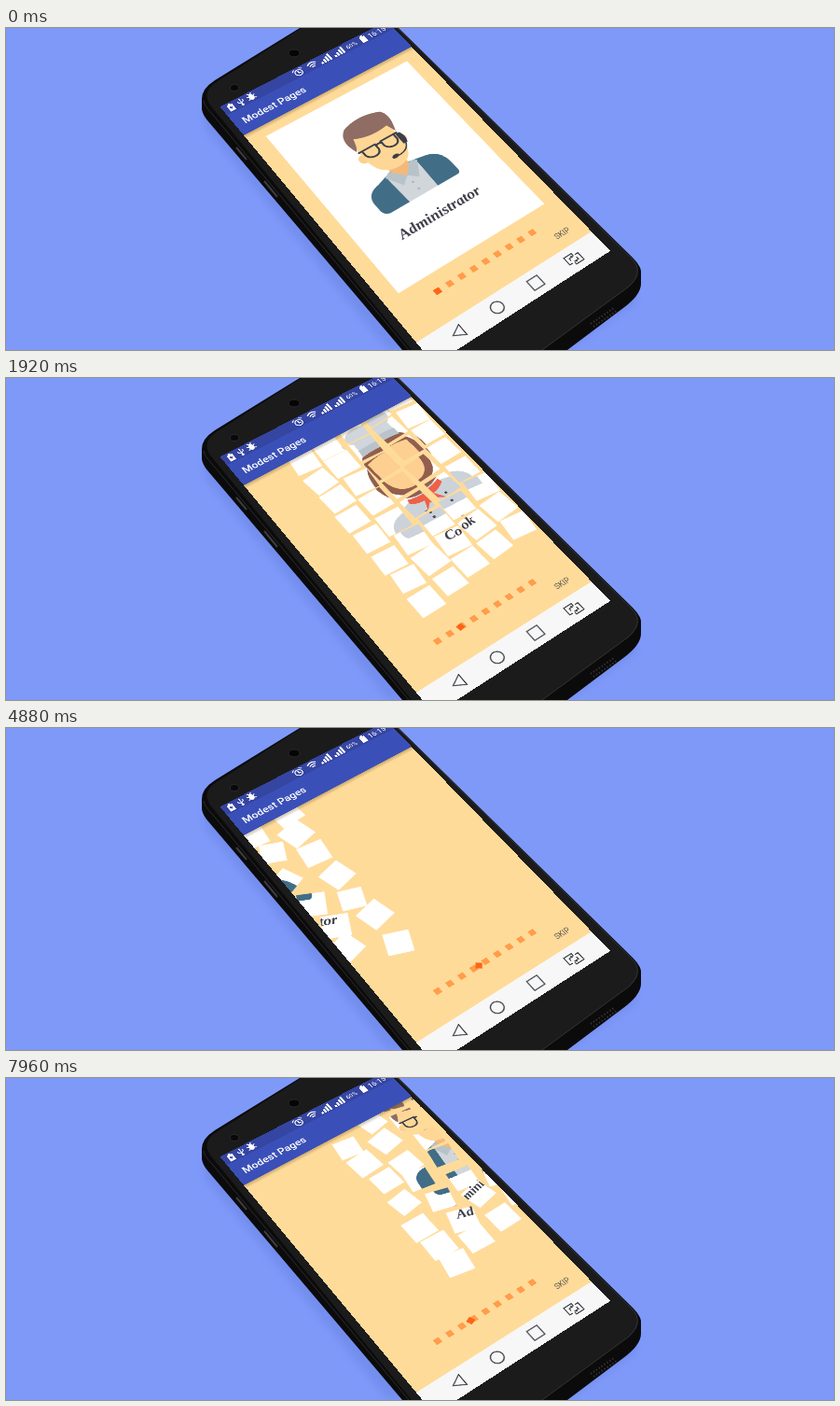
Recreate the animation shown at these times as an HTML page with a canvas. Size 888 px wide and 345 px high, loop 8 s.

```html
<!DOCTYPE html>
<html lang="en">
<head>
<meta charset="utf-8">
<title>Shattering pager</title>
<style>
html, body { margin: 0; width: 100%; height: 100%; overflow: hidden; background: #7f99f9; }
body { position: relative; }
body > svg { position: absolute; left: 0; top: 0; }
/* a flat 360 x 640 dp screen, laid onto the tilted phone */
#screen {
  position: absolute; left: 0; top: 0; width: 360px; height: 640px; overflow: hidden;
  background: #ffdb9a; transform-origin: 0 0;
  transform: matrix3d(.5714, -.2606, 0, .0001642, .27246, .36563, 0, -.0002018, 0, 0, 1, 0, 233.2, 85.75, 0, 1.01614);
}
#screen > * { position: absolute; left: 0; top: 0; }
text { font-family: Roboto, Arial, sans-serif; }
</style>
</head>
<body>
<svg width="888" height="345" viewBox="0 0 888 345">
  <defs><filter id="soft" x="-20%" y="-20%" width="140%" height="140%"><feGaussianBlur stdDeviation="4"/></filter></defs>
  <path d="M212 88L214 108L410 345H602L676 294L670 250Z" fill="#6c86e6" opacity=".6" filter="url(#soft)"/>
  <path d="M315 0L224 56Q210 65 210 76V87Q211 93 216 99L425 345H602L662 300Q681 286 681 274V260Q680 254 672 246L421 0Z" fill="#0b0b0c"/>
  <path d="M317 0L227 57Q208 68 220 84L435 345H575L668 277Q686 263 671 247L420 0Z" fill="#1b1b1c"/>
  <path d="M212 78Q213 84 221 92L432 345" fill="none" stroke="#2c2c2e"/>
  <path d="M420 0L671 247Q685 261 668 277L575 345" fill="none" stroke="#343436"/>
  <path d="M247 128L258 141M277 164L291 181" stroke="#3c3c3e" stroke-width="2"/>
  <path d="M627 317L652 300M630 320L655 303" stroke="#333" stroke-width="2" stroke-dasharray="1.5 2"/>
  <ellipse cx="309" cy="27" rx="6" ry="4" fill="#050506" stroke="#29292c"/>
  <ellipse cx="245" cy="64" rx="4.5" ry="3.5" fill="#08080a" stroke="#29292c"/>
</svg>
<div id="screen">
  <canvas id="pager" width="360" height="640"></canvas>
  <svg width="360" height="640" viewBox="0 0 360 640">
    <defs><linearGradient id="drop" x2="0" y2="1"><stop stop-color="#604000" stop-opacity=".32"/><stop offset="1" stop-color="#604000" stop-opacity="0"/></linearGradient></defs>
    <rect y="80" width="360" height="9" fill="url(#drop)"/>
    <rect width="360" height="80" fill="#3a50b8"/>
    <rect width="360" height="24" fill="#3545a2"/>
    <text x="16" y="59" font-size="20" font-weight="500" fill="#fff">Modest Pages</text>
    <g fill="#fff">
      <path d="M10 6H13V3H18V6H21V21H10Z"/>
      <path d="M15 9L12 14H15L14 18L19 12H16Z" fill="#3545a2"/>
      <path d="M36 3V19M31 8V12L36 15M41 7V11L36 14" stroke="#fff" stroke-width="1.8" fill="none"/>
      <circle cx="36" cy="19" r="2.5"/>
      <ellipse cx="57" cy="13" rx="5" ry="7"/>
      <path d="M49 9L65 18M49 18L65 9M53 3L57 7L61 3" stroke="#fff" stroke-width="2" fill="none"/>
      <path d="M178 9Q187 1 196 9M181 13Q187 8 193 13M184 17Q187 14 190 17" stroke="#fff" stroke-width="2.4" fill="none"/>
      <g id="bars"><path d="M203 21V16H207V21ZM209 21V12H213V21ZM215 21V8H219V21ZM221 21V4H225V21Z"/></g>
      <use href="#bars" x="29"/>
      <path d="M293 6H296V3H301V6H304V21H293Z"/>
      <text x="261" y="17" font-size="12">60%</text>
      <text x="310" y="18" font-size="15">16:15</text>
    </g>
    <g fill="none" stroke="#fff" stroke-width="2"><circle cx="157" cy="13" r="7"/><path d="M157 8V14H161M147 7L152 3M162 3L167 7"/></g>
    <text x="318" y="571" font-size="14" text-anchor="middle" fill="#5d564b">SKIP</text>
    <rect y="592" width="360" height="48" fill="#f7f7f7"/>
    <g fill="none" stroke="#42464c" stroke-width="2">
      <path d="M54 616L73 605V627Z"/>
      <circle cx="142" cy="616" r="11"/>
      <rect x="210.5" y="605.5" width="21" height="21"/>
      <path d="M294 622H288V606H304V611M308 611H314V627H298V622M295 617V612H302L299 609M307 616V621H300L303 624"/>
    </g>
  </svg>
</div>
<script>
const LOOP = 8000, STEP = 40;
const CARD = { x: 29.5, y: 103.5, w: 302, h: 398, cols: 6, rows: 8 };
const ctx = document.getElementById('pager').getContext('2d');
const clamp = v => Math.max(0, Math.min(1, v));
const rnd = n => { const v = Math.sin(n * 12.9898 + 4.1) * 43758.5453; return v - Math.floor(v); };

// each part: [fill, path, stroke colour, stroke width]
const admin = [
  ['#416d87', 'M82 262Q70 260 70 246V230Q72 207 98 202L130 191H170L202 197Q229 204 229 236V252Q229 262 222 262Z'],
  ['#d0d6da', 'M118 196L150 212L182 194L180 262H121Z'],
  ['#f3b97b', 'M131 176H169V196L150 215L131 196Z'],
  ['#b7c3c9', 'M128 190L150 214L134 228L116 197ZM172 190L150 214L166 228L184 196Z'],
  ['#aab4ba', 'M148 229h4v4h-4zM148 246h4v4h-4z'],
  ['#fdd08e', 'M101 142a9 10 0 0 1 18 0a9 10 0 0 1-18 0M181 142a9 10 0 0 1 18 0a9 10 0 0 1-18 0'],
  ['#fed796', 'M111 88H189V145Q186 190 150 190Q114 190 111 145Z'],
  ['#8f6d64', 'M109 122Q96 86 119 68Q156 53 193 70Q206 84 191 122L185 103Q148 110 120 95Q116 112 109 122Z'],
  [, 'M117 126H144V138Q142 148 131 148Q119 147 117 137ZM156 126H183V138Q181 148 170 148Q158 147 156 137ZM144 130Q150 126 156 130M109 126H117M183 126H191', '#3d3e49', 3.6],
  ['#3d3e49', 'M186 128h8q6 12 0 26h-8zM152 167q8-6 14 0q-4 8-14 4z'],
  [, 'M191 152Q186 170 163 170', '#3d3e49', 2.5]
];
const cashier = [
  ['#4b4651', 'M99 148Q94 60 124 32Q155 12 186 32Q216 62 211 148Q205 180 177 180H132Q104 178 99 148Z'],
  ['#ee6248', 'M80 248Q68 240 70 224Q74 203 100 197L132 186H178L208 195Q238 202 238 234Q238 250 224 250Z'],
  ['#d5503a', 'M100 224L106 250H98ZM207 224L202 250H210Z'],
  ['#f3b97b', 'M136 168H174V190L155 208L136 190Z'],
  ['#d3dae2', 'M134 184L155 206L139 217L125 191ZM176 184L155 206L171 217L185 191Z'],
  ['#fdcf90', 'M114 76H196V132Q192 184 155 184Q118 184 114 132Z'],
  ['#ef6046', 'M112 48Q155 28 198 48L200 72Q155 58 110 72Z'],
  ['#cf4836', 'M110 72Q155 54 200 72V84Q155 68 110 84Z'],
  ['#d3dae2', 'M153 222h4v4h-4zM153 237h4v4h-4z'],
  ['#4b4651', 'M188 212h12v8h-12z']
];
const cook = [
  ['#ccd2d9', 'M78 250Q70 248 70 232Q74 206 100 200L132 188H178L208 197Q236 206 238 234V250Z'],
  ['#935e4e', 'M98 126Q98 60 154 60Q210 60 210 126Q210 188 154 190Q100 188 98 126Z'],
  ['#fdcf90', 'M112 88Q154 76 196 88V128Q192 174 154 175Q116 174 112 128Z'],
  ['#d0d6db', 'M116 72V38Q96 28 112 12Q130 -2 152 6Q180 -4 194 12Q208 28 190 38V72Q154 62 116 72Z'],
  ['#bac3ca', 'M115 57Q154 49 191 57V75Q154 65 115 75Z'],
  ['#ef6046', 'M122 186Q154 200 186 186L188 197Q170 209 158 208L171 232L153 218L138 232L148 208Q130 207 120 197Z'],
  ['#4b4651', 'M132 229h5v5h-5zM174 220h5v5h-5zM132 242h5v5h-5zM178 238h5v5h-5z']
];

function paint(parts, name, dx = 0, dy = 0) {
  const c = document.createElement('canvas'), k = 2;
  c.width = CARD.w * k;
  c.height = CARD.h * k;
  const g = c.getContext('2d');
  g.scale(k, k);
  g.fillStyle = '#fff';
  g.fillRect(0, 0, CARD.w, CARD.h);
  g.save();
  g.translate(dx, dy);
  for (const [fill, d, stroke, width] of parts) {
    const path = new Path2D(d);
    if (fill) { g.fillStyle = fill; g.fill(path); }
    if (stroke) { g.strokeStyle = stroke; g.lineWidth = width; g.stroke(path); }
  }
  g.restore();
  g.fillStyle = '#3d3e49';
  g.font = 'italic bold 28.5px "Liberation Serif", serif';
  g.textAlign = 'center';
  g.fillText(name, 149, 318);
  return c;
}
const adminPage = paint(admin, 'Administrator');
const pages = [adminPage, paint(cashier, 'Cashier', -6, 18), paint(cook, 'Cook', -6, 18), adminPage];

// d: signed distance of the page from the centre, in pages
function drawPage(i, d) {
  const { x, y, w, h, cols, rows } = CARD, img = pages[i], p = Math.abs(d);
  if (p > .75) return;
  if (p < .001) { ctx.drawImage(img, x, y, w, h); return; }
  const cw = w / cols, ch = h / rows, sw = img.width / cols, sh = img.height / rows;
  const shrink = 1 - Math.exp(-p / .08);
  for (let r = 0; r < rows; r++) for (let c = 0; c < cols; c++) {
    const seed = (i * rows + r) * cols + c + 1;
    const spread = n => (rnd(seed + n) * 2 - 1) * p;
    const s = 1 - (.03 + .14 * rnd(seed + 900)) * shrink;
    // leading and upper pieces fly further
    const lead = (d > 0 ? c : cols - 1 - c) * cw, above = (rows - 1 - r) * ch;
    const dx = d * (540 + .8 * lead), dy = -p * (150 + 1.5 * lead + .35 * above);
    ctx.save();
    ctx.translate(x + (c + .5) * cw + dx + 28 * spread(300), y + (r + .5) * ch + dy + 28 * spread(500));
    ctx.rotate(1.2 * spread(700));
    ctx.scale(s, s);
    ctx.drawImage(img, c * sw, r * sh, sw, sh, -cw / 2, -ch / 2, cw, ch);
    ctx.restore();
  }
}

function dot(n, color, turn = 0) {
  ctx.save();
  ctx.translate(83.3 + 24.4 * n, 535.5);
  ctx.rotate(turn);
  ctx.fillStyle = color;
  ctx.fillRect(-5.5, -5.5, 11, 11);
  ctx.restore();
}

const swipe = (t, start, length) => 1 - (1 - clamp((t - start) / length) ** 1.2) ** 4;
const dragKeys = [[3820, 0], [4320, .18], [4880, .42], [5320, .42], [5960, .137], [6120, .07],
  [6300, .025], [6520, .007], [6960, 0], [7380, 0], [7960, -.27]];
function drag(t) {
  if (t <= dragKeys[0][0]) return 0;
  const n = dragKeys.findIndex(k => k[0] >= t);
  const [t0, a] = dragKeys[n - 1], [t1, b] = dragKeys[n];
  return a + (b - a) * (t - t0) / (t1 - t0);
}
const position = t => swipe(t, 20, 1100) + swipe(t, 1380, 1100) + swipe(t, 2660, 950) + drag(t);

function frame(now) {
  const t = Math.floor(now % LOOP / STEP) * STEP, pos = position(t);
  ctx.clearRect(0, 0, 360, 640);
  pages.forEach((_, i) => drawPage(i, i - pos));
  for (let n = 0; n < 9; n++) dot(n, '#ff9d4b');
  dot(pos, '#ff6416', pos * Math.PI / 2);
  requestAnimationFrame(frame);
}
frame(0);
</script>
</body>
</html>
```
